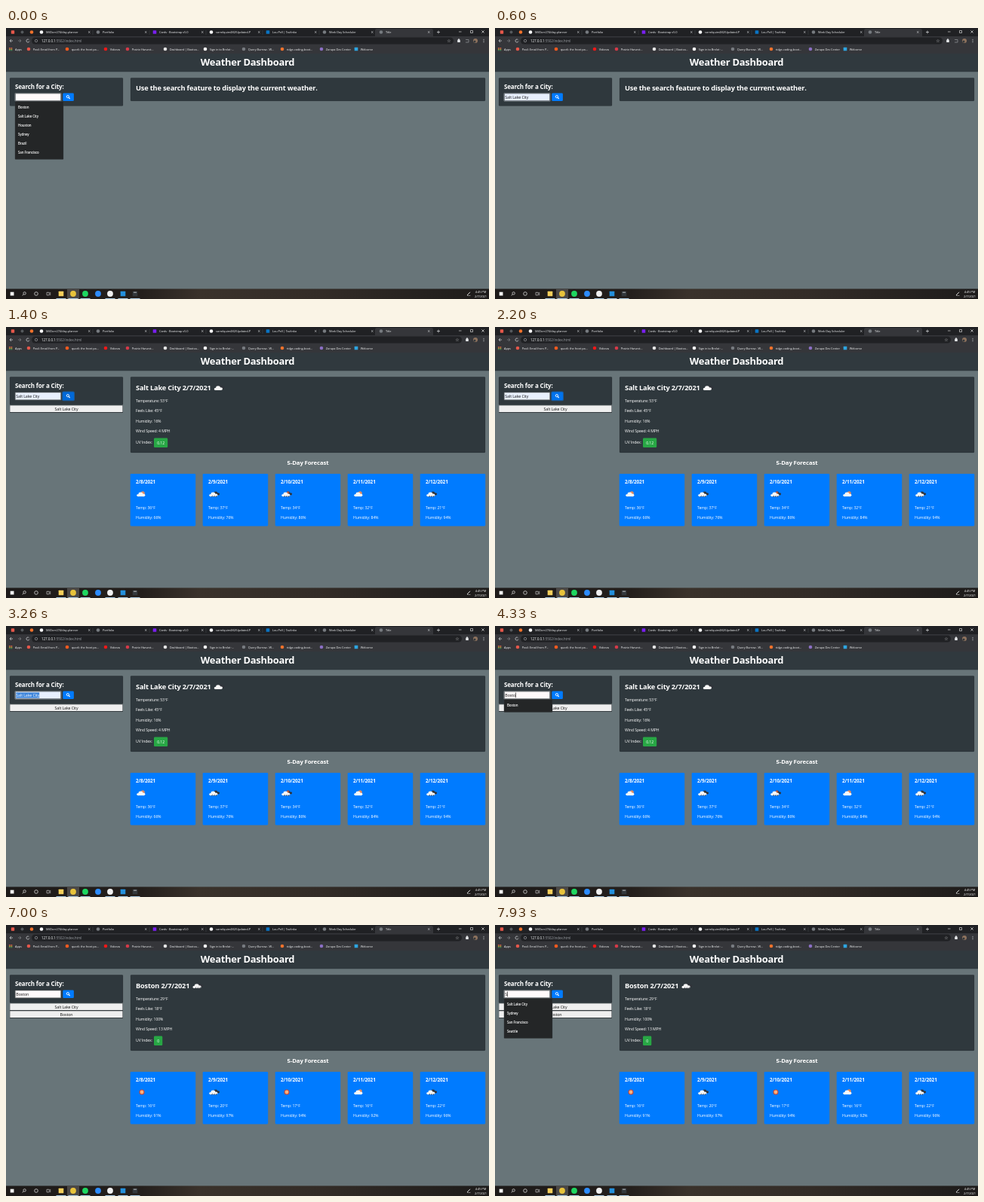
These frames come from a looping animation (640 px wide and 360 px high, 8 s). An HTML page with a canvas:

```html
<!DOCTYPE html>
<html lang="en">
<head>
<meta charset="utf-8">
<title>Weather Dashboard</title>
<style>
html, body { margin: 0; width: 100%; height: 100%; overflow: hidden; background: #687579; }
canvas { display: block; width: 640px; height: 360px; }
</style>
</head>
<body>
<canvas id="stage" width="640" height="360"></canvas>
<script>
const ctx = document.getElementById('stage').getContext('2d');
const LOOP = 8000;
const FONT = '"Open Sans", "Noto Sans", sans-serif';

// Drawing helpers
function rect(x, y, w, h, fill, radius = 0, stroke, line = 0.7) {
  ctx.beginPath();
  ctx.roundRect(x, y, w, h, radius);
  if (fill) { ctx.fillStyle = fill; ctx.fill(); }
  if (stroke) { ctx.strokeStyle = stroke; ctx.lineWidth = line; ctx.stroke(); }
}
function dot(x, y, r, fill, stroke, line = 0.7) {
  ctx.beginPath();
  ctx.arc(x, y, r, 0, 7);
  if (fill) { ctx.fillStyle = fill; ctx.fill(); }
  if (stroke) { ctx.strokeStyle = stroke; ctx.lineWidth = line; ctx.stroke(); }
}
function path(points, color, line = 0.8) {
  ctx.beginPath();
  for (let i = 0; i < points.length; i += 2) ctx.lineTo(points[i], points[i + 1]);
  ctx.strokeStyle = color;
  ctx.lineWidth = line;
  ctx.stroke();
}
function text(str, x, y, size, color = '#fff', weight = 400, align = 'left') {
  ctx.font = `${weight} ${size}px ${FONT}`;
  ctx.letterSpacing = `${-0.02 * size}px`;
  ctx.textAlign = align;
  ctx.fillStyle = color;
  ctx.fillText(str, x, y);
  return ctx.measureText(str).width;
}
function cross(x, y, r, color) {
  path([x - r, y - r, x + r, y + r], color, 0.7);
  path([x - r, y + r, x + r, y - r], color, 0.7);
}
const clamp = v => Math.max(0, Math.min(1, v));
const fade = (t, from, to) => clamp((t - from) / 130) - clamp((t - to) / 130);
const within = (t, from, to) => t >= from && t < to;

// Content
const TABS = [
  ['MilDorr274/day-planner', '#fff', 'circle'],
  ['Portfolio', '#777b80', 'circle'],
  ['Cards · Bootstrap v5.0', '#7a1ff0', 'square'],
  ['sorrelquim482/Updated-P', '#fff', 'circle'],
  ['Lou Pell | Tavlinko', '#0a74c4', 'square'],
  ['Work Day Scheduler', '#777b80', 'circle'],
  ['Title', '#777b80', 'circle']
];
const BOOKMARKS = [
  [30, '#e6574b', 'Pexil: Email from P...'], [81, '#ff5a1f', 'quorli: the front pa...'],
  [132, '#f01818', 'Vidorza'], [161, '#d63a48', 'Prairie Harvest...'],
  [211, '#e4e4e4', 'Dashboard | Bootca...'], [264, '#fff', 'Sign in to Brelot ·...'],
  [315, '#777b80', 'Query Burrow - W...'], [366, '#f0722c', 'ridge-coding-boot...'],
  [418, '#8b6fc4', 'Zorupa Dev Center'], [464, '#2da5e0', 'Welcome']
];
const TASKS = [
  [73, '#f5cf5c', 'square'], [89, '#e8c33b', 'circle'], [105, '#1ed760', 'circle'],
  [122, '#2d8cff', 'circle'], [138, '#f1f1f1', 'circle'], [155, '#2490dc', 'square'],
  [171, '#33383c', 'square']
];
const WEATHER = {
  'Salt Lake City': {
    icon: 'broken',
    now: ['53°F', '45°F', '16%', '4 MPH'], uv: '0.12',
    days: [['few', 36, 66], ['rain', 37, 76], ['shower', 34, 86], ['few', 32, 84], ['rain', 21, 94]]
  },
  'Boston': {
    icon: 'rain',
    now: ['29°F', '18°F', '100%', '13 MPH'], uv: '0',
    days: [['sun', 16, 91], ['rain', 20, 97], ['sun', 17, 94], ['few', 16, 92], ['rain', 22, 96]]
  }
};
const CITIES = ['Boston', 'Salt Lake City', 'Houston', 'Sydney', 'Brazil', 'San Francisco'];
const S_CITIES = ['Salt Lake City', 'Sydney', 'San Francisco', 'Seattle'];

function badge(x, y, r, color, shape) {
  if (shape === 'square') rect(x - r, y - r, 2 * r, 2 * r, color, 0.6);
  else dot(x, y, r, color);
}

function browser(t) {
  const grey = '#c4c7ca';
  rect(0, 0, 640, 12, '#202124');
  rect(489, 1, 77, 14, '#35363a', 2.5);
  rect(0, 11, 640, 23, '#35363a');
  badge(9, 5.5, 2.2, '#e6574b', 'square');
  dot(21.5, 5.5, 2, '#55595d');
  dot(34, 5.5, 2.3, '#f0722c');
  TABS.forEach(([name, color, shape], i) => {
    const x = 47 + 75 * i;
    badge(x, 5.5, 2.3, color, shape);
    text(name, x + 6, 7, 3.95, '#f1f3f4');
    cross(x + 63.3, 5.5, 1.2, grey);
    if (i < 5) path([x + 68, 3, x + 68, 9], '#55585c', 0.4);
  });
  path([571, 5.5, 575, 5.5], grey);
  path([573, 3.5, 573, 7.5], grey);
  path([600, 5, 603.5, 5], '#eee', 0.6);
  rect(615.5, 3.5, 3, 3, null, 0, '#eee', 0.6);
  cross(632, 5, 1.6, '#eee');

  const star = t < 1400 ? 587 : 598;
  rect(34, 12.5, star - 28, 9, '#202124', 4.5);
  path([9, 17, 5, 17], grey);
  path([7, 15, 5, 17, 7, 19], grey);
  path([16, 17, 20, 17], '#77797c');
  path([18, 15, 20, 17, 18, 19], '#77797c');
  ctx.beginPath();
  ctx.arc(29, 17, 2, 0.3, 5.5);
  ctx.strokeStyle = grey;
  ctx.stroke();
  dot(40, 17, 1.7, null, grey, 0.5);
  const host = text('127.0.0.1', 47, 18.8, 4.6, '#f1f3f4');
  text(':5502/index.html', 47 + host, 18.8, 4.6, '#989ca1');
  text('☆', star, 19, 6, '#e4e6e8', 400, 'center');
  rect(star + 11.2, 15.5, 3.6, 3.6, '#e4e6e8', 0.5);
  dot(star + 13, 15.3, 1, '#e4e6e8');
  if (t < 1400) path([609, 15.5, 613, 15.5, 613, 19, 609, 19], '#a5a8ab', 0.6);
  dot(622, 17, 3, '#8f735e');
  dot(621, 18, 1.5, '#34383b');
  for (const y of [15.2, 17, 18.8]) dot(633, y, 0.5, '#e4e6e8');

  ['#e8584c', '#f0bd38', '#48a860'].forEach((color, row) => {
    for (let col = 0; col < 3; col++) rect(4 + col * 1.6, 26 + row * 1.6, 1.1, 1.1, color);
  });
  text('Apps', 12, 29.5, 3.95, '#f1f3f4');
  for (const [x, color, name] of BOOKMARKS) {
    badge(x, 28, 2.3, color, x === 464 ? 'square' : 'circle');
    text(name, x + 5.7, 29.5, 3.95, '#f1f3f4');
  }
}

function taskbar() {
  const shade = ctx.createLinearGradient(0, 0, 640, 0);
  shade.addColorStop(0, '#1d1a19');
  shade.addColorStop(0.28, '#241f1c');
  shade.addColorStop(0.4, '#3a322b');
  shade.addColorStop(0.65, '#332c27');
  shade.addColorStop(1, '#1d1b1a');
  rect(0, 346.5, 640, 13.5, shade);
  rect(81, 346.5, 16, 13.5, '#4b4846');
  rect(5.7, 350.7, 4.8, 4.8, '#f2f2f2');
  dot(24.6, 352.4, 1.7, null, '#eee');
  path([23.3, 353.7, 21.8, 355.4], '#eee');
  dot(40, 353, 2.3, null, '#eee');
  rect(54, 351.3, 3.2, 3.6, null, 0, '#ddd', 0.6);
  path([58.7, 351, 58.7, 355.2], '#ddd', 0.6);
  for (const [x, color, shape] of TASKS) {
    badge(x, 353, shape === 'square' ? 3.3 : 3.9, color, shape);
    if (x !== 122) rect(x - 6.5, 359, 13, 1, '#a9cbe4');
  }
  path([169, 351.2, 173, 351.2], '#ddd', 0.8);
  path([611, 355, 615, 350.8], '#ddd', 1);
  path([611, 355.5, 615.5, 355.5], '#ddd', 0.5);
  text('4:45 PM', 629, 351.8, 4, '#fff', 400, 'center');
  text('2/7/2021', 629, 358, 4, '#fff', 400, 'center');
}

// Wide, flat cloud centred on x, y
function cloud(x, y, color, scale = 1) {
  ctx.fillStyle = color;
  for (const [dx, dy, r] of [[-4.2, 1.2, 1.6], [-0.8, -0.4, 2.5], [3, 0.9, 1.9]]) {
    ctx.beginPath();
    ctx.ellipse(x + dx * scale, y + dy * scale, r * 1.2 * scale, r * scale, 0, 0, 7);
    ctx.fill();
  }
  rect(x - 4.2 * scale, y + 0.4 * scale, 7.4 * scale, 2.4 * scale, color);
}
function weatherIcon(kind, x, y) {
  if (kind === 'sun') {
    dot(x, y, 3.5, '#c9473a');
    dot(x, y, 2.4, '#f8b27c');
    return;
  }
  if (kind === 'few') dot(x + 1.2, y - 1.2, 2.6, '#e58a5c');
  else cloud(x + 2.6, y - 1, '#30343a', 0.85);
  if (kind === 'shower') dot(x + 1.6, y - 2, 1.7, '#b8543c');
  cloud(x - 0.8, y + 0.4, '#f8f8f8', 0.98);
  if (kind === 'rain' || kind === 'shower') {
    for (const dx of [-2.5, 0.3, 3]) path([x + dx, y + 1.8, x + dx - 0.8, y + 4], '#30343a', 0.8);
  }
}

function card(x, y, w, h) {
  rect(x, y, w, h, '#2f383d', 1.3, 'rgba(0,0,0,.22)', 0.5);
}

function report(city) {
  if (!city) {
    card(165, 66.3, 470, 30.7);
    text('Use the search feature to display the current weather.', 172, 82.7, 9.25, '#fff', 700);
    return;
  }
  const data = WEATHER[city];
  card(165, 66.3, 470, 100.7);
  const width = text(`${city} 2/7/2021`, 172, 84.1, 9.25, '#fff', 700);
  weatherIcon(data.icon, 172 + width + 11, 80.8);
  ['Temperature', 'Feels Like', 'Humidity', 'Wind Speed'].forEach((label, i) =>
    text(`${label}: ${data.now[i]}`, 172, 100 + i * 13.35, 5.15));
  text('UV Index:', 172, 155.1, 5.15);
  const badgeWidth = data.uv.length > 1 ? 18.2 : 11.3;
  rect(196, 147.6, badgeWidth, 12.4, '#28a745', 1.3);
  text(data.uv, 196 + badgeWidth / 2, 155.8, 5.15, '#fff', 400, 'center');
  text('5-Day Forecast', 400, 183, 7.8, '#fff', 700, 'center');
  data.days.forEach(([icon, temp, humidity], i) => {
    const x = 165 + 96 * i;
    rect(x - 0.3, 195, 86.5, 69.4, '#007bff', 1.3);
    text(`2/${8 + i}/2021`, x + 7, 208.4, 6.4, '#fff', 700);
    weatherIcon(icon, x + 15, 222);
    text(`Temp: ${temp}°F`, x + 7, 242, 5.15);
    text(`Humidity: ${humidity}%`, x + 7, 255.4, 5.15);
  });
}

function fieldValue(t) {
  if (t < 60) return '';
  if (t < 200) return 'Boston';
  if (t < 3800) return 'Salt Lake City';
  if (t < 7800) return 'Boston'.slice(0, 1 + Math.floor((t - 3800) / 120));
  return 'S';
}

function searchField(t) {
  const value = fieldValue(t);
  const focused = t < 1130 || within(t, 2870, 5800) || t >= 7130;
  const selected = within(t, 3000, 3800) || within(t, 7330, 7800);
  const caret = within(t, 3800, 5000) || within(t, 5530, 5800) || t >= 7800;
  if (focused) rect(11.8, 86.5, 61.4, 10.8, null, 0.8, '#b4babd', 0.5);
  rect(12.3, 87, 60.4, 9.8, within(t, 60, 3800) ? '#e8f0fe' : '#fffafb', 0,
    focused ? '#3a4145' : '#767676', 0.6);
  ctx.font = `400 5.3px ${FONT}`;
  ctx.letterSpacing = '-0.106px';
  const width = ctx.measureText(value).width;
  if (selected) rect(13.3, 88.4, width, 7.2, '#3b84dc');
  text(value, 13.3, 93.8, 5.3, selected ? '#fff' : '#161616');
  if (caret) rect(13.4 + width, 88.5, 0.6, 6.8, '#000');
}

function searchButton(t) {
  const hover = fade(t, 800, 2130) + fade(t, 5260, 6330);
  const ring = fade(t, 1130, 2800) + fade(t, 5800, 6530);
  if (ring > 0) rect(74.2, 85.6, 16.8, 12.6, `rgba(0,123,255,${0.5 * ring})`, 2);
  rect(75.3, 86.6, 14.6, 10.5, `rgb(0,${123 - 18 * hover},${255 - 38 * hover})`, 1.3);
  dot(81.9, 91.2, 1.6, null, '#fff', 0.9);
  path([83.1, 92.4, 84.7, 94], '#fff', 1.1);
}

function history(t) {
  const cities = t < 1200 ? [] : t < 5930 ? ['Salt Lake City'] : ['Salt Lake City', 'Boston'];
  cities.forEach((city, i) => {
    const y = 104 + 10 * i;
    rect(5, y, 150, 9.8, '#25292c');
    rect(5.3, y + 0.2, 149.2, 8.9, '#efefef');
    text(city, 80, y + 6.8, 5.3, '#111', 400, 'center');
  });
}

function suggestions(t) {
  let items = [];
  let active = -1;
  if (t < 600) {
    items = CITIES;
    active = t < 60 ? -1 : t < 200 ? 0 : 1;
  } else if (within(t, 3800, 4460)) {
    items = t < 3920 ? ['Boston', 'Brazil'] : ['Boston'];
  } else if (t >= 7870) {
    items = S_CITIES;
  }
  if (!items.length) return;
  rect(12, 97.5, 64, 12 * items.length + 5, '#242627', 0.8, '#3b4042', 0.4);
  items.forEach((city, i) => {
    const y = 99.8 + 12 * i;
    if (i === active) rect(12, y, 64, 12, '#45484a');
    text(city, 16, y + 7.6, 4.4, '#fff', 600);
  });
}

function draw(t) {
  rect(0, 0, 640, 360, '#687579');
  browser(t);
  rect(0, 34, 640, 24.3, '#30393e');
  text('Weather Dashboard', 320, 50.3, 12.95, '#fff', 700, 'center');
  card(5, 66.3, 150, 37.2);
  text('Search for a City:', 12, 81.2, 8, '#fff', 700);
  searchField(t);
  searchButton(t);
  history(t);
  report(t < 1400 ? null : t < 6000 ? 'Salt Lake City' : 'Boston');
  suggestions(t);
  taskbar();
}

function tick(now) {
  draw(now % LOOP);
  requestAnimationFrame(tick);
}
draw(0);
requestAnimationFrame(tick);
</script>
</body>
</html>
```
